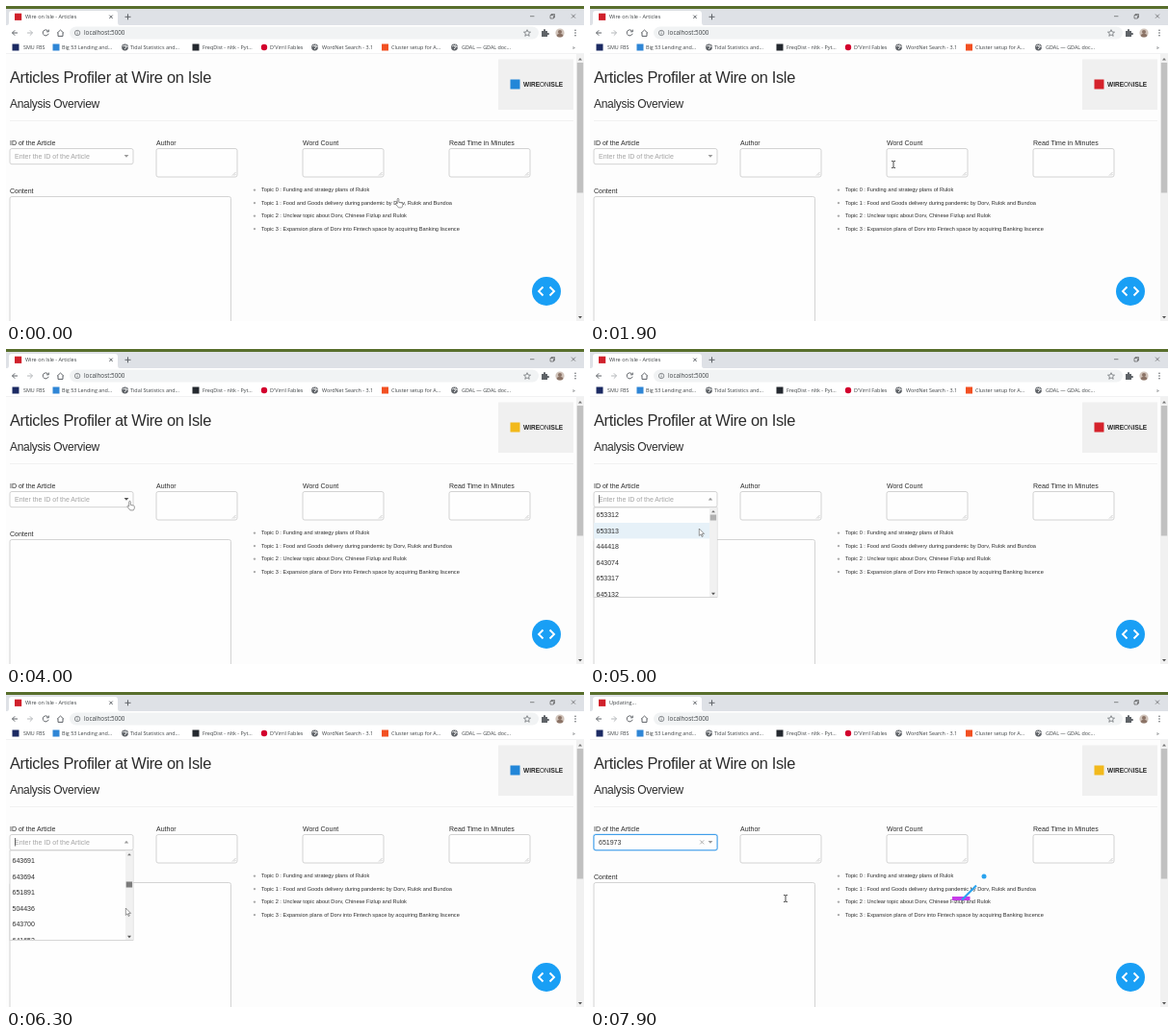
An HTML page that plays this animation: 600 px wide and 328 px high, repeating every 8000 ms.

```html
<!DOCTYPE html>
<html lang="en">
<head>
<meta charset="utf-8">
<title>Articles Profiler</title>
<style>
html, body { margin: 0; width: 100%; height: 100%; overflow: hidden; background: #fdfdfd; }
svg { display: block; width: 100vw; height: 100vh; }
text { font-family: "Liberation Sans", Arial, sans-serif; fill: #2c2c2c; white-space: pre; }
.ui { font-family: "Open Sans", "Noto Sans", sans-serif; fill: #3c4043; }
.label { font-size: 7px; }
.hint { font-size: 7px; fill: #a3a3a3; }
.topic { font-size: 5.62px; }
.box { fill: #fefefe; stroke: #cfcfcf; stroke-width: .9; }
.icon { fill: none; stroke: #5f6368; stroke-width: 1; }
</style>
</head>
<body>
<svg id="stage" viewBox="0 0 600 328" xmlns="http://www.w3.org/2000/svg"></svg>
<script>
const LOOP = 8000, OPEN = 4600, CHOSEN = 7400, LOADING = 7500;
const ROW = 16.5, FIRST_ROW = 172.7;
const SITE = 'Wire on Isle';

const rect = (x, y, w, h, fill, extra = '') =>
  `<rect x="${x}" y="${y}" width="${w}" height="${h}" fill="${fill}" ${extra}/>`;
const path = (d, extra) => `<path d="${d}" ${extra}/>`;
const text = (x, y, content, cls, extra = '') =>
  `<text x="${x}" y="${y}" class="${cls}" ${extra}>${content}</text>`;
const ui = (x, y, size, content, extra = '') => text(x, y, content, 'ui', `font-size="${size}" ${extra}`);
const icon = d => path(d, 'class="icon"');

function globe(x) {
  return `<circle cx="${x}" cy="43" r="3.4" fill="#5f6368"/>` +
    path(`M${x - 2.4} 42q2-2 3 0t-1 3M${x + 1} 40.5q0 2 2 2`, 'fill="none" stroke="#fff" stroke-width=".9"');
}

function textarea(x, y, w, h) {
  const r = x + w, b = y + h;
  return `<rect x="${x}" y="${y}" width="${w}" height="${h}" rx="2" class="box"/>` +
    path(`M${r - 5} ${b - 1.5}l3.5 -3.5M${r - 3} ${b - 1.5}l1.5 -1.5`, 'stroke="#aaa" stroke-width=".6"');
}

function browser() {
  const square = (x, fill) => rect(x - 3.5, 39.5, 7, 7, fill);
  const bookmarks = [
    [18, 'SMU FBS', square(10, '#1b2a63')],
    [58, 'Big 53 Lending and...', square(52, '#2f86d6')],
    [129, 'Tidal Statistics and...', globe(123.5)],
    [204, 'FreqDist - nltk - Pyt...', square(197, '#24292f')],
    [274, "D'Virril Fables", '<circle cx="268" cy="43" r="3.2" fill="#d3002d"/>'],
    [328, 'WordNet Search - 3.1', globe(320.5)],
    [400, 'Cluster setup for A...', square(393.5, '#f25022')],
    [473, 'GDAL — GDAL doc...', globe(465.5)]
  ];
  return rect(0, 0, 600, 20, '#dee1e6') + rect(0, 0, 600, 3, '#586e2c') +
    path('M1 20q2 0 2-3V8q0-3 3-3h107q3 0 3 3v9q0 3 2 3z', 'fill="#fff"') +
    rect(9, 7.7, 7.2, 7.2, '#d0202b') +
    ui(20, 13.3, 5.5, '', 'id="tab"') +
    icon('M107.3 9.6l3.4 3.4m0-3.4l-3.4 3.4M123.5 11.3h6m-3-3v6') +
    path('M544 10.7h4.4M565 9.6h3.4v3.4H565zM566 9.6V8.5h3.5V12h-1.1M587 8.6l4 4m0-4l-4 4',
      'fill="none" stroke="#444" stroke-width=".6"') +
    rect(0, 20, 600, 30, '#fff') +
    rect(66, 21.5, 487, 13, '#f1f3f4', 'rx="6.5"') +
    icon('M12 28H6.5m2.7-2.7L6.5 28l2.7 2.7M53 28.3l3.5-3.3 3.5 3.3M54 27.8v3.6h5v-3.6') +
    path('M22 28h5.5m-2.7-2.7l2.7 2.7-2.7 2.7', 'fill="none" stroke="#b5b8bb"') +
    icon('M43.8 26.3a3 3 0 1 0 .3 2.5M44.3 24.6v2.2h-2.2') +
    path('M71.4 28a2.7 2.7 0 1 0 5.4 0a2.7 2.7 0 1 0-5.4 0M74.1 27.6v2m0-3.4v.7', 'fill="none" stroke="#5f6368" stroke-width=".7"') +
    ui(81, 30.3, 6.3, 'localhost:5000') +
    path('M541 24.7l1 2.3 2.5.2-1.9 1.6.6 2.5-2.2-1.4-2.2 1.4.6-2.5-1.9-1.6 2.5-.2z', 'fill="none" stroke="#5f6368" stroke-width=".7"') +
    path('M556 26h2q-.5-2 1-2t1 2h2v2q2-.5 2 1t-2 1v2h-6z', 'fill="#5f6368"') +
    '<circle cx="575" cy="28" r="4.6" fill="#d0c3ba"/><circle cx="575" cy="27" r="2" fill="#8b7366"/>' +
    path('M571.5 31a3.6 3 0 0 1 7 0a4.6 4.6 0 0 1-7 0', 'fill="#8b7366"') +
    [25.3, 28, 30.7].map(y => `<circle cx="591" cy="${y}" r=".8" fill="#5f6368"/>`).join('') +
    bookmarks.map(([x, name, mark]) => mark + ui(x, 45.2, 5.4, name)).join('') +
    ui(588, 45, 5.5, '»') +
    rect(0, 49.5, 600, .6, '#e4e6e8');
}

function page() {
  const labels = ['ID of the Article', 'Author', 'Word Count', 'Read Time in Minutes'];
  const topics = [
    'Funding and strategy plans of Rulok',
    'Food and Goods delivery during pandemic by Dorv, Rulok and Bundoa',
    'Unclear topic about Dorv, Chinese Fizlup and Rulok',
    'Expansion plans of Dorv into Fintech space by acquiring Banking liscence'
  ];
  return rect(0, 50, 600, 278, '#fdfdfd') +
    text(4, 80.3, `Articles Profiler at ${SITE}`, '', 'font-size="16.4" letter-spacing="-.32"') +
    text(4, 105.8, 'Analysis Overview', '', 'font-size="12" letter-spacing="-.3"') +
    rect(511, 55.5, 78, 52.5, '#f0f0f0') +
    rect(523.5, 76.5, 10, 10, '#000', 'id="mark"') +
    text(537, 84.3, 'WIRE<tspan font-weight="400">ON</tspan>ISLE', '', 'font-size="6.5" font-weight="700" style="fill:#222"') +
    rect(4, 119, 585, .7, '#ececec') +
    labels.map((name, i) => text(4 + 152 * i, 144.6, name, 'label')).join('') +
    [156, 308, 460].map(x => textarea(x, 148.5, 84, 29.5)).join('') +
    text(4, 194.8, 'Content', 'label') +
    textarea(4, 198.5, 229.5, 150) +
    topics.map((topic, i) =>
      `<circle cx="258" cy="${191.6 + 13.5 * i}" r="1.2" fill="#aaa"/>` +
      text(265, 193.4 + 13.5 * i, `Topic ${i} : ${topic}`, 'topic')).join('') +
    rect(592, 50, 8, 278, '#f1f1f1') + rect(592.8, 59, 6.4, 135.5, '#c1c1c1') +
    path('M594 56.5l2-2.4 2 2.4z', 'fill="#777"') +
    path('M594 323l2 2.4 2-2.4z', 'fill="#505050"') +
    '<circle cx="561" cy="297" r="15" fill="#199ff5"/>' +
    path('M557.5 292.5l-4.5 4.5 4.5 4.5M564.5 292.5l4.5 4.5-4.5 4.5', 'fill="none" stroke="#fff" stroke-width="1.9"');
}

function dropdown() {
  return '<rect id="glow" x="3" y="147.5" width="130" height="18" rx="3" fill="#b9dcf7"/>' +
    '<rect id="field" x="4" y="148.5" width="128" height="16.2" rx="2" class="box"/>' +
    text(9, 159, '', 'hint', 'id="value"') +
    path('M114.2 154.4l4 4m0-4l-4 4', 'id="clear" stroke="#999" stroke-width=".8"') +
    '<path id="arrow"/>' +
    '<g id="menu">' +
      rect(9, 152, .7, 8.5, '#333') +
      rect(4, 165, 128, 93.5, '#fefefe', 'stroke="#ccc" stroke-width=".8"') +
      '<g id="rows" clip-path="url(#menuClip)"></g>' +
      rect(124, 165, 7.6, 93, '#f1f1f1') +
      path('M126 170.3l2-2.4 2 2.4z', 'fill="#777"') +
      path('M126 253.8l2 2.4 2-2.4z', 'fill="#555"') +
      rect(124.7, 172, 6.4, 6, '#aaa', 'id="thumb"') +
    '</g>';
}

function spinner() {
  return '<g id="spinner">' +
    rect(376, 213, 18.5, 4, '#c63ce8', 'id="bar"') +
    path('M386 216.5L401 201.5', 'id="slash" stroke="#2aa3ee" stroke-width="2.2" pathLength="1" stroke-dasharray="1"') +
    '<circle id="dot" cx="409" cy="192" r="2.5" fill="#2aa3ee"/></g>';
}

// Each pointer is drawn with its hot spot at the origin.
const pointers = {
  arrow: path('M0 0v7.4l1.8-1.6 1.1 2.7 1.1-.5-1.1-2.6h2.4z', 'fill="#fff" stroke="#555" stroke-width=".6"'),
  hand: path('M-.8.8q0-1 .8-1t.8 1v3l3.2.8q1 .3.9 1.4l-.4 2.3-.8 1.1H.4L-2.4 5.8q-.5-1 .4-1.2l1.2.8z', 'fill="#fff" stroke="#555" stroke-width=".6"'),
  beam: path('M-2-3.6q1.6 0 2 .7 .4-.7 2-.7M0-3V3M-2 3.6q1.6 0 2-.7 .4.7 2 .7', 'fill="none" stroke="#222" stroke-width=".8"')
};

document.getElementById('stage').innerHTML =
  '<clipPath id="menuClip"><rect x="4" y="165.4" width="127" height="92.6"/></clipPath>' +
  browser() + page() + dropdown() + spinner() + '<g id="pointer"></g>';

const el = Object.fromEntries([...document.querySelectorAll('#stage [id]')].map(n => [n.id, n]));
const set = (node, attrs) => { for (const k in attrs) node.setAttribute(k, attrs[k]); };
const show = (node, on) => { node.style.display = on ? '' : 'none'; };

// Keys are [time, ...values]; moves ease in and out between them.
function track(keys, t) {
  const i = keys.findIndex(k => k[0] > t);
  if (i < 0) return keys[keys.length - 1].slice(1);
  if (i === 0) return keys[0].slice(1);
  const a = keys[i - 1], b = keys[i];
  const u = (t - a[0]) / (b[0] - a[0]), e = u * u * (3 - 2 * u);
  return a.slice(1).map((v, n) => v + (b[n + 1] - v) * e);
}

const pointerKeys = [
  [0, 407, 200.5], [400, 407, 200.5], [1700, 315, 165], [2200, 315, 165],
  [3800, 128.5, 158.5], [4600, 128.5, 158.5], [5000, 113.3, 187], [5100, 113.3, 187],
  [5400, 127, 175], [6200, 126, 201], [6300, 124.3, 225], [6800, 121.3, 230],
  [7400, 121.3, 230], [7850, 203, 215]
];
const scrollKeys = [[5400, 0], [6200, 60 * ROW - 3], [6350, 60 * ROW - 3], [6750, 70 * ROW + 8]];

const knownRows = [
  [0, [653312, 653313, 444418, 643074, 653317, 645132]],
  [60, [643691, 643694, 651891, 504436, 643700, 641653]],
  [70, [647800, 645819, 647869, 641728, 651973, 645832]]
];
function articleId(i) {
  for (const [start, ids] of knownRows) if (ids[i - start]) return ids[i - start];
  return 641000 + (i * 7919 + 1237) % 12000;
}

function pointerKind(x, y, open) {
  const inside = (l, t, r, b) => x > l && x < r && y > t && y < b;
  if (open && inside(4, 165, 132, 258)) return 'arrow';
  if (inside(4, 148, 132, 165) || inside(255, 186, 472, 238)) return 'hand';
  if (inside(156, 148, 240, 178) || inside(308, 148, 392, 178) || inside(4, 198, 234, 328)) return 'beam';
  return 'arrow';
}

function drawMenu(t, x, y) {
  const [offset] = track(scrollKeys, t);
  const dragging = t >= 5400 && t <= 6300;
  const first = Math.max(0, Math.floor(offset / ROW) - 1);
  let rows = '';
  for (let i = first; i < first + 8; i++) {
    const mid = FIRST_ROW + i * ROW - offset;
    const hovered = !dragging && y > 165 && Math.abs(y - mid) < ROW / 2;
    if (hovered) rows += rect(4, mid - ROW / 2, 120, ROW, '#e6f1f8');
    rows += text(6.5, mid + 2.5, articleId(i), 'label');
  }
  el.rows.innerHTML = rows;
  set(el.thumb, { y: 172.5 + offset * 25 / 987, fill: dragging ? '#7c7c7c' : '#b0b0b0' });
}

function drawSpinner(t) {
  const grow = (from, to) => Math.min(1, Math.max(0, (t - from) / (to - from)));
  set(el.bar, { width: 18.5 * grow(LOADING, 7700) });
  set(el.slash, { 'stroke-dashoffset': 1 - grow(7600, 7850) });
  set(el.dot, { r: 2.5 * grow(7750, 7900) });
  show(el.slash, t > 7600);
}

function markColor(t) {
  const phase = (t + 700) % 3300;
  return phase < 1100 ? '#2286d8' : phase < 2200 ? '#f2b91c' : '#d5222b';
}

function render(t) {
  const open = t >= OPEN && t < CHOSEN, chosen = t >= CHOSEN;
  const [x, y] = track(pointerKeys, t);
  const kind = pointerKind(x, y, open);

  el.tab.textContent = t >= LOADING ? 'Updating...' : `${SITE} - Articles`;
  set(el.mark, { fill: markColor(t) });

  el.value.textContent = chosen ? '651973' : 'Enter the ID of the Article';
  el.value.style.fill = chosen ? '#333' : '';
  el.field.style.stroke = chosen ? '#2f96e8' : '';
  show(el.glow, chosen);
  show(el.clear, chosen);
  const onField = kind === 'hand' && y < 166 && x < 133;
  set(el.arrow, {
    d: open ? 'M122.8 157.4l2.2-2.6 2.2 2.6z' : 'M122.6 155l2.4 2.7 2.4-2.7z',
    fill: onField ? '#555' : '#999'
  });

  show(el.menu, open);
  if (open) drawMenu(t, x, y);
  show(el.spinner, t >= LOADING);
  if (t >= LOADING) drawSpinner(t);

  el.pointer.innerHTML = pointers[kind];
  set(el.pointer, { transform: `translate(${x} ${y})` });
}

const start = performance.now();
function tick() {
  const t = (performance.now() - start) % LOOP;
  render(Math.floor(t / 100) * 100);
  requestAnimationFrame(tick);
}
tick();
</script>
</body>
</html>
```
